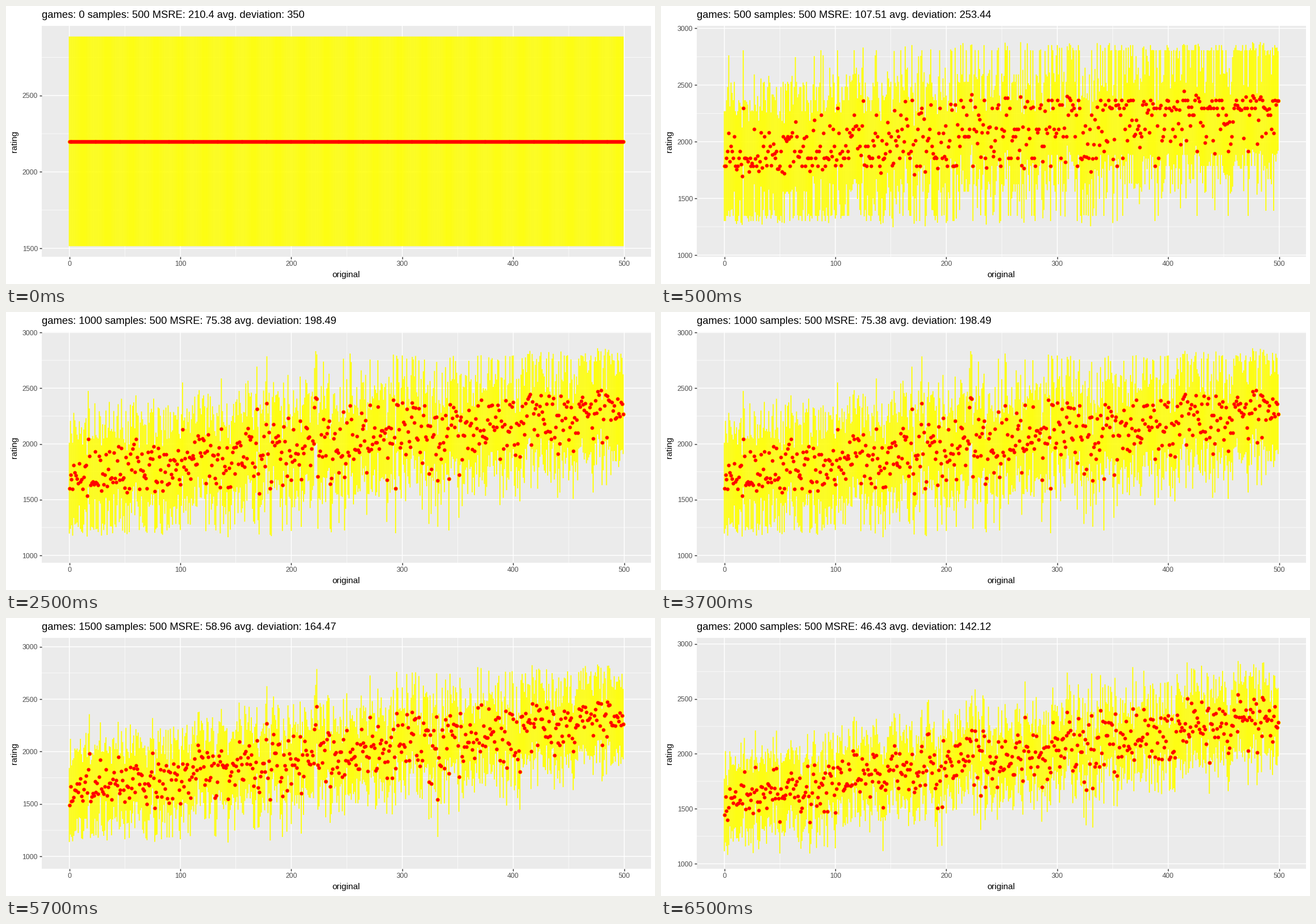
These frames come from a looping animation (1143x490 px, 8000 ms). A matplotlib script:

```python
import numpy as np
import matplotlib.pyplot as plt
from matplotlib.animation import FuncAnimation
from matplotlib.collections import LineCollection

W, H, DPI = 1143, 490, 100
LEFT, RIGHT, TOP, BOTTOM = 62.8, 1135.6, 35.3, 441.8
N = 500
X = np.arange(N)
Q = np.log(10) / 400
STEP_MS, FRAMES, HOLD = 500, 16, 4
LINE = 1.07

plt.rcParams["font.family"] = "Liberation Sans"


def glicko(r, rd, opp_r, opp_rd, score):
    """One Glicko update: new rating and deviation after a single game."""
    g = 1 / np.sqrt(1 + 3 * (Q * opp_rd / np.pi) ** 2)
    expected = 1 / (1 + 10 ** (-g * (r - opp_r) / 400))
    info = (Q * g) ** 2 * expected * (1 - expected)
    var = 1 / (1 / rd ** 2 + info)
    return r + Q * var * g * (score - expected), np.sqrt(var)


def play_round(rng, skill, r, rd):
    """Pair everybody once; now and then a random opponent steps in."""
    for a, b in rng.permutation(N).reshape(-1, 2):
        if rng.random() < 0.2:
            b = rng.integers(N)
        if a == b:
            continue
        win = rng.random() < 1 / (1 + 10 ** ((skill[b] - skill[a]) / 400))
        new_a = glicko(r[a], rd[a], r[b], rd[b], win)
        new_b = glicko(r[b], rd[b], r[a], rd[a], not win)
        (r[a], rd[a]), (r[b], rd[b]) = new_a, new_b


def build_stages():
    rng = np.random.default_rng(12)
    u = X / N - 0.5
    skill = 870 * u + 950 * u ** 3
    r, rd = np.zeros(N), np.full(N, 350.0)
    limits = [(1445.4, 2954.6), (986, 3021), (935, 3003.6),
              (883.6, 3083.3), (955.6, 3054.2)]
    scores = ["210.4 350", "107.51 253.44", "75.38 198.49",
              "58.96 164.47", "46.43 142.12"]
    stages = []
    for k, (lim, score) in enumerate(zip(limits, scores)):
        if k:
            for _ in range(4):
                if _ < 2:
                    play_round(rng, skill, r, rd)
        msre, dev = score.split()
        title = f"games: {k * N} samples: {N} MSRE: {msre} avg. deviation: {dev}"
        # The field's mean sinks towards 1950, halving its distance each stage.
        rating = r - r.mean() + 1950 + 250 * 0.5 ** k
        half = 1.96 * rd
        bars = [[(x, y - h), (x, y + h)] for x, y, h in zip(X, rating, half)]
        stages.append((title, lim, np.column_stack([X, rating]), bars))
    return stages


fig = plt.figure(figsize=(W / DPI, H / DPI), dpi=DPI, facecolor="white")
ax = fig.add_axes([LEFT / W, 1 - BOTTOM / H, (RIGHT - LEFT) / W, (BOTTOM - TOP) / H],
                  facecolor="#EBEBEB")
for spine in ax.spines.values():
    spine.set_visible(False)


def grid(draw, start, stop, step):
    for i, v in enumerate(range(start, stop, step)):
        draw(v, color="white", lw=LINE / 2 if i % 2 else LINE, zorder=1, snap=False)


def label(x, y, text, size, **kw):
    return fig.text(x / W, 1 - y / H, text, fontsize=size, color="black",
                    va="baseline", **kw)


def dots(color, size, z):
    return ax.scatter(X, X, s=size ** 2, c=color, linewidths=0, zorder=z, snap=False)


grid(ax.axvline, 0, 501, 50)
grid(ax.axhline, 500, 3501, 250)
ax.set_xticks(range(0, 501, 100))
ax.set_yticks(range(1000, 3001, 500))
ax.tick_params(length=2.75, width=LINE, color="#333333",
               labelsize=8.8, labelcolor="#4D4D4D", pad=2.2)

title = label(LEFT, 20.8, "", 13.2)
label(599, 477.7, "original", 11, ha="center")
label(18.8, 238.5, "rating", 11, ha="center", rotation=90, rotation_mode="anchor")

bars = LineCollection([], colors="yellow", linewidths=1.3, zorder=2, snap=False)
ax.add_collection(bars, autolim=False)
halo = dots("yellow", 5.7, 3)
core = dots("red", 4.6, 4)
ax.set_xlim(-24.95, 523.95)
stages = build_stages()


def update(frame):
    # The opening picture lasts one step, each later one four.
    text, lim, points, segments = stages[(frame + HOLD - 1) // HOLD]
    title.set_text(text)
    ax.set_ylim(lim)
    bars.set_segments(segments)
    halo.set_offsets(points)
    core.set_offsets(points)
    return title, bars, halo, core


anim = FuncAnimation(fig, update, frames=FRAMES, interval=STEP_MS,
                     init_func=lambda: update(0), repeat=True, repeat_delay=0, blit=False)
plt.show()
```
